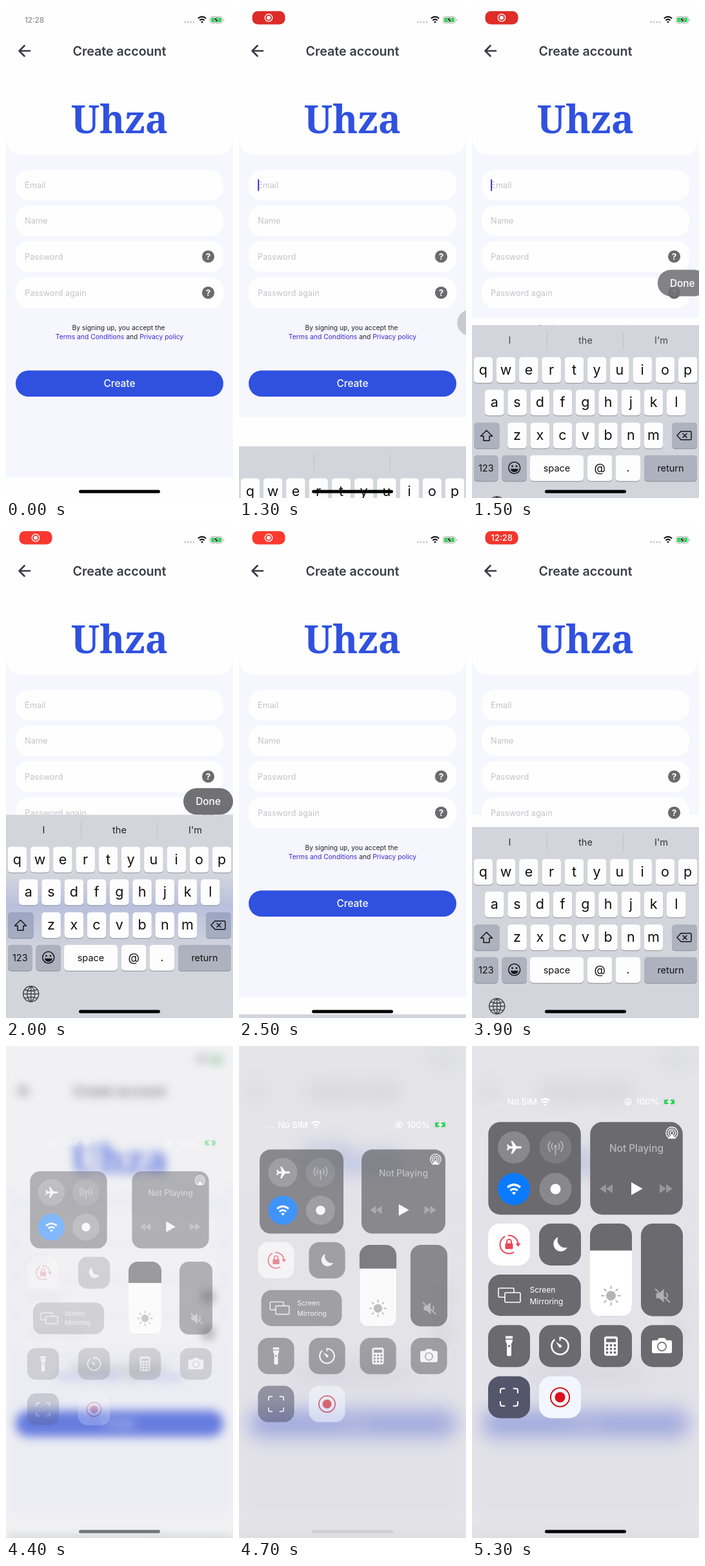
Animation of 352 by 762 pixels, one loop 5.4 s. Source, as an HTML page:

```html
<!DOCTYPE html>
<html lang="en">
<head>
<meta charset="utf-8">
<title>Create account</title>
<style>
html, body { margin: 0; width: 100%; height: 100%; overflow: hidden; background: #fff; }
svg { display: block; font-family: Inter, sans-serif; }
.line { fill: none; stroke: #fff; stroke-width: 2; stroke-linecap: round; stroke-linejoin: round; }
</style>
</head>
<body>
<svg id="stage" width="352" height="762" viewBox="0 0 352 762"></svg>
<script>
const LOOP = 5400, KEYBOARD_TOP = 447, KEYBOARD_HEIGHT = 315, SHEET_TRAVEL = 283;
const GREY = '#6b6a6e', BLUE = '#3051e0';

// Markup helpers
const rect = (x, y, w, h, r, fill, more = '') =>
  `<rect x="${x}" y="${y}" width="${w}" height="${h}" rx="${r}" fill="${fill}" ${more}/>`;
const disc = (x, y, r, fill = '#fff', more = '') =>
  `<circle cx="${x}" cy="${y}" r="${r}" fill="${fill}" ${more}/>`;
const ring = (x, y, r, color, width) => disc(x, y, r, 'none', `stroke="${color}" stroke-width="${width}"`);
const text = (x, y, s, size, fill, weight = 400, anchor = 'middle') =>
  `<text x="${x}" y="${y}" font-size="${size}" fill="${fill}" font-weight="${weight}" text-anchor="${anchor}">${s}</text>`;
const line = (d, more = '') => `<path class="line" d="${d}" ${more}/>`;
const shape = (d, fill = '#fff', more = '') => `<path d="${d}" fill="${fill}" ${more}/>`;
const at = (x, y, body, scale = 1) => `<g transform="translate(${x} ${y}) scale(${scale})">${body}</g>`;
const group = (id, body) => `<g id="${id}">${body}</g>`;

const wifi = color => line('M-6.2-2.2Q0-7.4 6.2-2.2M-3.6.8Q0-2.2 3.6.8', `style="stroke:${color};stroke-width:2.1;stroke-linecap:butt"`)
  + shape('M-1.9 3Q0 1.4 1.9 3L0 5.2z', color);
const battery = (shell, bolt) => rect(.5, .5, 19, 10, 3, 'none', `stroke="${shell}"`) + rect(2, 2, 16, 7, 1.6, '#30d158')
  + shape('M21 4v3.5q1.4-.4 1.4-1.75T21 4z', shell)
  + shape('M11.6-.5L6 6.2h3.6L8.4 11.5 14 4.8h-3.6z', bolt, 'stroke="#fff" stroke-width=".8"');

// Sign-up form
const field = (y, h, label, help) => rect(15, y, 322, h, 20, '#fefefe')
  + text(29, y + h / 2 + 4.6, label, 12.8, '#c3c3c8', 400, 'start')
  + (help ? disc(313.5, y + h / 2, 9.6, GREY) + text(313.5, y + h / 2 + 4.8, '?', 13.5, '#fff', 700) : '');

const form = rect(0, 0, 352, 762, 0, '#fefefe')
  + rect(0, 190, 352, 540, 0, '#f6f6fe', 'id="sheet"')
  + shape('M0 0H352V205Q350 231 324 231H28Q2 231 0 205z', '#fefefe')
  + line('M37 69.5H20.5M28.5 61.5l-8 8 8 8', 'style="stroke:#3b3b46;stroke-width:2.7"')
  + text(176, 76.5, 'Create account', 19.6, '#3b3b46', 600)
  + `<g font-family="Noto Serif, serif">${text(176, 197, 'Uhza', 59, BLUE, 700)}</g>`
  + field(254, 47, 'Email') + field(309, 47, 'Name')
  + field(364, 48, 'Password', true) + field(420, 48, 'Password again', true)
  + rect(29.2, 268.5, 1.9, 18, 0, '#3a2bd0', 'id="caret"')
  + text(174.5, 502, 'By signing up, you accept the', 10.3, '#222228')
  + text(176, 516, '<tspan fill="#3a28d0">Terms and Conditions</tspan> and <tspan fill="#3a28d0">Privacy policy</tspan>', 10.3, '#222228')
  + rect(15, 564.5, 322, 40.5, 20, BLUE, 'id="create"') + text(176, 590.3, 'Create', 15.4, '#fff', 500);

const statusBar = group('clock', text(44, 25.5, '12:28', 11.5, '#9a9a9c', 600))
  + group('pill', rect(20.5, 8, 51, 20.5, 8.5, '#f33', 'id="pillFill"')
    + group('recording', ring(46, 18.2, 5.7, '#fff', 1.3) + disc(46, 18.2, 3))
    + group('pillTime', text(46.3, 22.8, '12:28', 13, '#fff', 500)))
  + [277.5, 282, 286.5, 291].map(x => disc(x, 25, 1.4, '#c6c6c8')).join('')
  + at(304, 21.4, wifi('#111')) + at(316, 16, battery('#a9a9ab', '#111'));

// Keyboard
const key = (x, y, w, fill, label = '', size = 21.5, drop = 7) =>
  rect(x, y + 1, w, 40, 5, '#8b8d94') + rect(x, y, w, 40, 5, fill)
  + text(x + w / 2, y + 20 + drop, label, size, '#111');
const row = (letters, x, y) => [...letters].map((c, i) => key(x + i * 35.25, y, 29.6, '#fdfdfe', c)).join('');
const dark = (x, y, w, label, size) => key(x, y, w, '#adb2be', label, size, 5);
const ink = 'style="stroke:#15151a;stroke-width:1.5"';

const keyboard = rect(0, 447, 352, 315, 0, '#d3d5dc')
  + rect(116, 458, 1, 26, 0, '#bfc1c8') + rect(234, 458, 1, 26, 0, '#bfc1c8')
  + group('hints', text(58.5, 476, 'I', 14.5, '#222') + text(176, 476, 'the', 14.5, '#222') + text(293.5, 476, "I'm", 14.5, '#222'))
  + dark(3, 598, 39.5) + dark(310, 598, 39) + dark(3, 648.5, 37.5, '123', 14.5)
  + dark(46.5, 648.5, 38.5) + dark(267, 648.5, 82, 'return', 14.5)
  + `<rect id="tint" y="540" width="352" height="120" fill="url(#glow)"/>`
  + row('qwertyuiop', 2.6, 496.5) + row('asdfghjkl', 20, 547) + row('zxcvbnm', 55.2, 598)
  + key(90, 648.5, 83, '#fdfdfe', 'space', 14.5, 5) + key(179, 648.5, 38.5, '#fdfdfe', '@', 18, 6) + key(222.5, 648.5, 38.5, '#fdfdfe', '.', 18, 5)
  + line('M22.5 610l-9 9h4.5v7h9v-7h4.5z', ink)
  + line('M324 611.5h14.5q1.5 0 1.5 1.5v10q0 1.5-1.5 1.5H324l-6-6.5zM327 615l6 6m0-6l-6 6', ink)
  + ring(65.7, 668, 9, '#15151a', 1.5) + disc(62.5, 665.5, 1.4, '#15151a') + disc(69, 665.5, 1.4, '#15151a')
  + shape('M59.8 669.5h12q-1 5.2-6 5.2t-6-5.2z', '#15151a')
  + at(38.7, 724.5, ring(0, 0, 12, '#45464b', 1.5)
    + line('M-12 0H12M0-12V12M0-12C-8-6-8 6 0 12C8 6 8-6 0-12M-9.5-6.5Q0-3 9.5-6.5M-9.5 6.5Q0 3 9.5 6.5', 'style="stroke:#45464b;stroke-width:1.4"'));

const doneButton = rect(275, 406, 77, 41, 20.5, '#717074') + text(313.5, 432, 'Done', 15.4, '#fff', 500);

// Control centre: [centre x, centre y, width, height, fill, icon, drop, shrink, fade power]
const tile = (x, y, icon, drop, fill = GREY) => [x, y, 65, 65, fill, icon, drop, .135, 1];
const skip = 'M-10-7v14L0 0zM0-7v14L10 0z';
const rays = Array.from({length: 8}, (_, i) => line('M0-11V-14.5', `transform="rotate(${i * 45})" style="stroke:#b5b4b8"`)).join('');
const calcKeys = Array.from({length: 9}, (_, i) => disc(i % 3 * 6 - 6, (i / 3 | 0) * 5.6 - 1.2, 1.9, GREY)).join('');

const tiles = [
  [97, 189.5, 143.5, 143.5, GREY,
    disc(-32, -32.5, 25, '#89888c') + disc(32.5, -32.5, 25, '#7d7c80') + disc(-32, 32, 25, '#0a7aff') + disc(32.5, 32, 25, '#89888c')
    + at(-32, -32.5, shape('M12 0c0 1.2-1 1.8-2.5 1.8H4L-2 10h-2.5l2.6-8.2h-5L-9 4.5h-2L-9.6 0l-1.4-4.5h2l2.1 2.7h5L-4.5-10H-2L4-1.8h5.5C11-1.8 12-1.2 12 0z'))
    + at(32.5, -34, `<g opacity=".4">${disc(0, 0, 2.4)}${line('M0 2V13M-4.5 4.5Q-8 0-4.5-4.5M4.5 4.5Q8 0 4.5-4.5M-8.5 7.5Q-14 0-8.5-7.5M8.5 7.5Q14 0 8.5-7.5')}</g>`)
    + at(-32, 33, wifi('#fff'), 1.6) + disc(32.5, 32, 8), 36, .094, .5],
  [255, 189.5, 143.5, 143.5, GREY,
    text(0, -26, 'Not Playing', 15.4, '#b9b8bb', 500) + shape('M-8 21.5v20L9.5 31.5z')
    + at(-47, 31.5, shape(skip, '#98979b'), -1) + at(46, 31.5, shape(skip, '#98979b'))
    + at(55, -55, line('M-5.8 6.9a9 9 0 1 1 11.6 0M-3.8 4.4a5.8 5.8 0 1 1 7.6 0M-1.8 2a2.7 2.7 0 1 1 3.6 0', 'style="stroke-width:1.4"') + shape('M0 1.5L6.5 9h-13z')), 36, .094, .5],
  tile(57.5, 307.5, line('M-7-12.2A14 14 0 1 0 7 12.2M-1-14A14 14 0 0 1 14-1', 'style="stroke:#e8485a"') + shape('M10-2h8l-4 5.5z', '#e8485a')
    + rect(-6, -2, 12, 9, 1.5, '#e8485a') + line('M-3.5-2v-2.5a3.5 3.5 0 0 1 7 0V-2', 'style="stroke:#e8485a"'), 24.5, '#fefefe'),
  tile(136.5, 307.5, shape('M-3-11.5A11.5 11.5 0 1 0 11.5 4.5 12 12 0 0 1-3-11.5z'), 24.5),
  [97, 386, 143.5, 64, GREY, line('M-46 3h-8.5q-1.5 0-1.5-1.5v-11q0-1.5 1.5-1.5h21q1.5 0 1.5 1.5V-4M-44.5-4h21q1.5 0 1.5 1.5v12q0 1.5-1.5 1.5h-21q-1.5 0-1.5-1.5v-12q0-1.5 1.5-1.5z', 'style="stroke-width:1.6"')
    + text(-7.5, -4.5, 'Screen', 12, '#fff', 400, 'start') + text(-7.5, 14, 'Mirroring', 12, '#fff', 400, 'start'), 20, .13, 1],
  [215.5, 346.7, 65, 143.5, GREY, shape('M-32.5-30h65V53q0 18.7-18.7 18.7H-13.8Q-32.5 71.7-32.5 53z') + at(0, 40, disc(0, 0, 7.5, '#b5b4b8') + rays), 24.5, .12, .3],
  [294.5, 346.7, 65, 143.5, GREY, at(1, 40, shape('M-10-4h5l7-6.5v21L-5 4h-5z', '#b0afb2') + line('M6-4q3 4 0 8M-11-10L11 10', 'style="stroke:#b0afb2"')), 24.5, .12, .5],
  tile(57.5, 464.7, shape('M-5.5-15.5h11v4h-11zM-5.5-10h11q0 4.500-2 6v17q0 2.500-2 2.500h-3q-2 0-2-2.500V-4q-2-1.500-2-6z') + disc(0, 0, 1.7, GREY), 15.5),
  tile(136.5, 464.7, line('M0-13A13 13 0 1 1-9.200-9.200', 'style="stroke-width:2.6"') + line('M0-13v4') + shape('M-6.500-6.500L2-1.200A2.300 2.300 0 0 1-1.200 2z'), 15.5),
  tile(215.5, 464.7, rect(-10.5, -15, 21, 30, 3.5, '#fff') + rect(-7.5, -11.5, 15, 5.5, 1, GREY) + calcKeys, 15.5),
  tile(294.5, 464.7, shape('M-13-9h6l2.500-3.500h9L7-9h6q2.500 0 2.500 2.500v15q0 2.500-2.500 2.500h-26q-2.500 0-2.500-2.500v-15q0-2.500 2.500-2.500z') + ring(0, .8, 6.6, GREY, 1.6), 15.5),
  tile(57.5, 544, line('M-13.500-7v-3.500q0-3 3-3H-7M7-13.500h3.500q3 0 3 3V-7M13.500 7v3.500q0 3-3 3H7M-7 13.500h-3.500q-3 0-3-3V7'), 10.5, '#54566c'),
  tile(136.5, 544, ring(0, 0, 14.6, '#d8121f', 2) + disc(0, 0, 8, '#dd0f1b'), 10.5, '#f2f6ff'),
];
const panel = tiles.map(([, , w, h, fill, icon]) => `<g class="tile">${rect(-w / 2, -h / 2, w, h, 18.5, fill)}${icon}</g>`).join('');
const panelStatus = [33, 38, 42.5, 47].map(x => disc(x, 90, 1.2, '#fff', 'opacity=".4"')).join('')
  + text(54.5, 91.2, 'No SIM', 13.4, '#fff', 500, 'start') + at(113.5, 87, wifi('#fff'), 1.1)
  + ring(242, 86.5, 5, '#fff', 1.3) + rect(239.8, 86, 4.4, 3.3, .6, '#fff') + ring(242, 85.6, 1.4, '#fff', .9)
  + text(254, 91.2, '100%', 13.4, '#fff', 500, 'start') + at(296, 81, battery('#d8d8da', '#fff'));

const stage = document.getElementById('stage');
stage.innerHTML = `<defs><linearGradient id="glow" x2="0" y2="1"><stop stop-color="${BLUE}" stop-opacity="0"/><stop offset=".4" stop-color="${BLUE}"/><stop offset="1" stop-color="${BLUE}" stop-opacity="0"/></linearGradient></defs>`
  + group('app', form + statusBar + group('keyboard', keyboard) + group('done', doneButton))
  + rect(0, 0, 352, 762, 0, '#d7d6dc', 'id="veil"')
  + group('panelStatus', panelStatus) + panel
  + rect(113, 749.5, 126, 5, 2.5, '#000', 'id="home"');

const $ = id => document.getElementById(id);
const tileNodes = [...document.querySelectorAll('.tile')];
const clamp = v => Math.max(0, Math.min(1, v));
const settle = ms => { const x = Math.max(0, ms * .012); return 1 - (1 + x) * Math.exp(-x); };
const fade = (id, v) => $(id).setAttribute('opacity', clamp(v));
const move = (node, x, y, s = 1) => node.setAttribute('transform', `translate(${x} ${y}) scale(${s})`);

function draw(t) {
  const second = t >= 3080;
  const focused = second ? t < 3868 : t >= 1200 && t < 1980;
  const up = settle(t - 1220) - settle(t - 2005) + settle(t - 3095) - settle(t - 3868);
  const lift = t < 1950 ? settle(t - 1203) : settle(t - 3083) - settle(t - 3900);

  move($('keyboard'), 0, KEYBOARD_HEIGHT * (1 - up));
  $('sheet').setAttribute('height', 540 - SHEET_TRAVEL * lift);
  fade('hints', (up - .3) * 1.45);
  move($('tint'), 0, -KEYBOARD_HEIGHT * (1 - up));
  fade('tint', .16 * (1 - lift) * clamp(up * 3 - 2));
  fade('caret', focused && (t - (second ? 3080 : 1200)) % 1000 < 550 ? 1 : 0);

  const showDone = t >= 1220 && t < 2005 || t >= 3095 && t < 3868;
  move($('done'), 85 * (1 - up), 115 * (1 - up) ** 2);
  fade('done', showDone ? .1 + .9 * up : 0);

  const pulse = .5 - .5 * Math.cos((t - 1300) * Math.PI / 1000);
  $('pillFill').setAttribute('fill', `rgb(${220 + 35 * pulse},${44 + 15 * pulse},${40 + 8 * pulse})`);
  fade('clock', 1 - (t - 50) / 150);
  fade('pill', Math.min((t - 150) / 300, (4400 - t) / 200));
  fade('recording', (2750 - t) / 150);
  fade('pillTime', (t - 2700) / 150);

  // Control centre pulled down over the blurred form
  const haze = clamp((t - 4200) / 400), open = clamp((t - 4200) / 880), rest = (1 - open) / .432;
  $('app').style.filter = haze ? `blur(${15 * haze}px)` : 'none';
  fade('veil', .65 * haze);
  tiles.forEach(([x, y, , , , , drop, shrink, power], i) => {
    move(tileNodes[i], x, y + drop * rest, 1 - shrink * rest);
    tileNodes[i].setAttribute('opacity', open ** power);
  });
  move($('panelStatus'), 6 * rest, 35.5 * rest);
  fade('panelStatus', open * 2);
  fade('home', open > .95 ? 1 : Math.max(.08, 1 - haze));
}

const start = performance.now();
(function tick() {
  draw((performance.now() - start) % LOOP);
  requestAnimationFrame(tick);
})();
</script>
</body>
</html>
```
